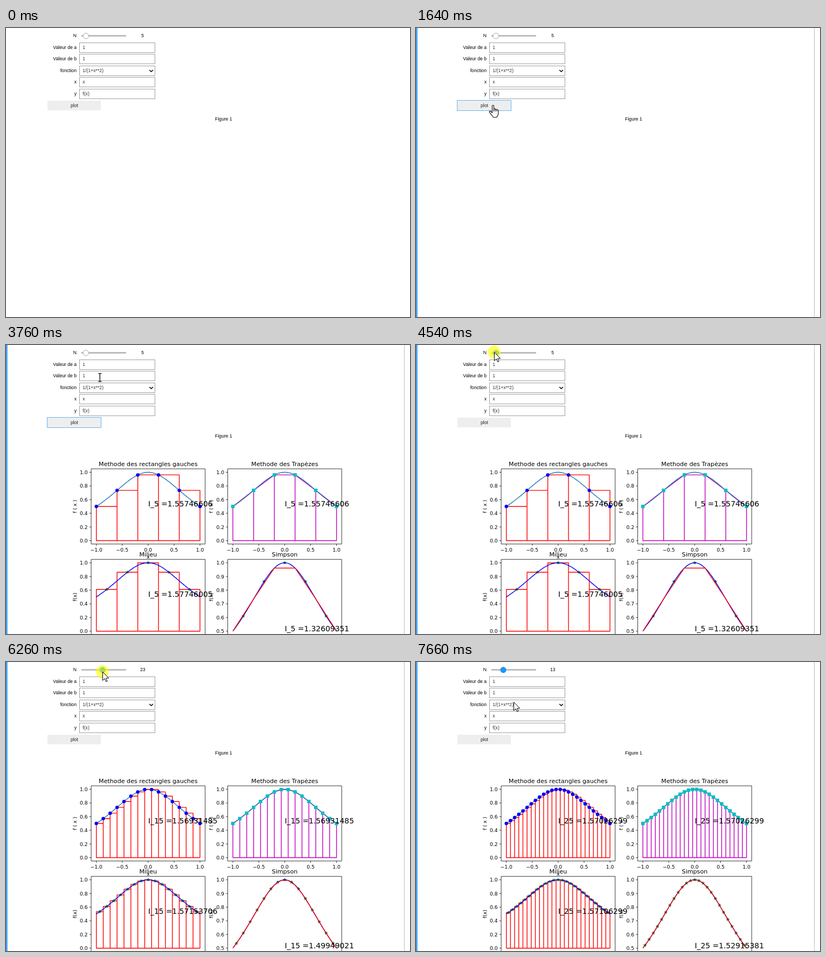
Recreate the animation shown at these times as an HTML page. Size 750 by 537 pixels, loop 8 s.

```html
<!DOCTYPE html>
<html lang="fr">
<head>
<meta charset="utf-8">
<title>Intégration numérique</title>
<style>
  html, body { margin: 0; width: 100%; height: 100%; overflow: hidden; background: #fff; }
  svg { display: block; }
  .ui { font: 8.67px "Liberation Sans", Arial, sans-serif; }
  .plot { font: 9.26px "DejaVu Sans", sans-serif; }
  .title { font-size: 11.11px; }
  .result { font-size: 13.89px; }
</style>
</head>
<body>
<svg id="stage" width="750" height="537" viewBox="0 0 750 537"></svg>
<script>
const LOOP = 8000;
const stage = document.getElementById('stage');

// Text fields: label, content, top edge
const FIELDS = [
  ['Valeur de a', '1', 27], ['Valeur de b', '1', 48], ['fonction', '1/(1+x**2)', 70],
  ['x', 'x', 91], ['y', 'f(x)', 113]
];

// Pointer glides: start, end, number of steps, destination
const GLIDES = [
  [70, 240, 4, 380, 296], [560, 710, 3, 207, 173], [880, 1190, 5, 142, 143],
  [2650, 2650, 1, 161, 126], [2735, 2820, 2, 182, 87], [3200, 3440, 4, 184, 73],
  [3760, 3990, 4, 145, 22], [4140, 4540, 6, 145, 13], [4860, 5150, 5, 165, 17],
  [5490, 5640, 3, 171, 18], [5800, 5940, 3, 176, 18], [6110, 6340, 4, 182, 18],
  [6570, 6800, 4, 161, 15], [7350, 7660, 5, 181, 74]
];
const PLOTS = [[1890, 5], [5320, 7], [5730, 15], [6270, 19], [7030, 25]];
const SIMPSON = { 5: '1.32609351', 7: '1.40569298', 15: '1.49949021', 19: '1.51529807', 25: '1.52915381' };

const text = (x, y, s, anchor = 'start', extra = '') =>
  `<text x="${x}" y="${y}" text-anchor="${anchor}" ${extra}>${s}</text>`;
const line = (d, color, width = 1.39) =>
  `<path d="${d}" fill="none" stroke="${color}" stroke-width="${width}" stroke-linejoin="round"/>`;
const f = x => 1 / (1 + x * x);
const range = (n, fn) => Array.from({ length: n }, (_, i) => fn(i));

function controls() {
  const rows = FIELDS.map(([label, value, top]) =>
    text(131, top + 12.2, label, 'end') +
    `<rect x="136.5" y="${top + .5}" width="140" height="18" fill="#fff" stroke="#9e9e9e"/>` +
    text(142.3, top + 12.2, value, 'start', 'fill="#333"')).join('');
  return `<g class="ui">${text(131, 17, 'N', 'end')}
    <rect x="140" y="13" width="83" height="3" fill="#bdbdbd"/>
    <circle id="handle" cy="14.8" r="5.2"/>
    <text id="value" x="253.7" y="17" text-anchor="middle"></text>
    ${rows}${line('M266.3 78l3.3 3.2 3.3-3.2', '#000', 1.6)}
    <g id="button"></g>${text(127, 147, 'plot', 'middle', 'fill="#222"')}
    ${text(404, 172, 'Figure 1', 'middle')}</g>`;
}

function axes({ cx, bottom, low, title, ylabel, draw, value }, n) {
  const X = x => (cx + 96.2 * x).toFixed(2);
  const Y = y => (bottom - 127 * (y - low) / (1 - low)).toFixed(2);
  const left = cx - 105.8, top = bottom - 133.4;
  const poly = pts => 'M' + pts.map(([x, y]) => `${X(x)} ${Y(y)}`).join('L');
  const marks = (xs, shape) => xs.map(x =>
    `<g transform="translate(${X(x)} ${Y(f(x))})">${shape}</g>`).join('');
  const curve = poly(range(101, i => [i / 50 - 1, f(i / 50 - 1)]));
  const nodes = range(n + 1, i => 2 * i / n - 1);
  const mids = range(n, i => (2 * i + 1) / n - 1);
  const bars = (l, r) => range(n, i => poly([[nodes[i], 0], [nodes[i], l(i)],
    [nodes[i + 1], r(i)], [nodes[i + 1], 0]]) + 'Z').join('');

  const frame = `M${left} ${top}h211.6v139.7h-211.6z`;
  let out = draw({ marks, poly, curve, nodes, mids, bars });
  out += line(frame, '#000', .8);
  for (let i = 0; i <= 5; i++) {
    const v = low + i * (1 - low) / 5, y = +Y(v);
    out += line(`M${left} ${y}h-3.2`, '#000', .8) + text(left - 6.5, y + 3.4, v.toFixed(1), 'end');
  }
  for (let v = -1; v <= 1; v += .5) {
    const x = X(v);
    out += line(`M${x} ${bottom + 6.3}v3.2`, '#000', .8) +
      text(x, bottom + 20.5, v.toFixed(1).replace('-', '−'), 'middle');
  }
  const lx = cx - 133, ly = bottom - 63.5;
  return out + text(cx, top - 5.6, title, 'middle', 'class="title"') +
    text(lx, ly, ylabel, 'middle', `transform="rotate(-90 ${lx} ${ly})"`) +
    text(cx, bottom - (low ? 0 : 63.5), `I_${n} =${value(n, nodes, mids)}`, 'start', 'class="result"');
}

const DOT = '<circle r="3.2" fill="#00f"/>';
const SQUARE = '<rect x="-3.2" y="-3.2" width="6.4" height="6.4" fill="#00bfbf"/>';
const STAR = '<path fill="#008000" stroke="#008000" stroke-width=".9" d="M' + range(10, i => {
  const r = i % 2 ? 1.06 : 2.78, a = i * Math.PI / 5;
  return `${(r * Math.sin(a)).toFixed(2)} ${(-r * Math.cos(a)).toFixed(2)}`;
}).join('L') + 'z"/>';
const sum = (xs, n) => (xs.reduce((s, x) => s + f(x), 0) * 2 / n).toFixed(8);
const leftSum = (n, nodes) => sum(nodes.slice(0, n), n);

const CHARTS = [
  { cx: 263.9, bottom: 363.5, low: 0, title: 'Methode des rectangles gauches', ylabel: 'f ( x )',
    value: leftSum,
    draw: p => line(p.curve, '#1f77b4') +
      line(p.bars(i => f(p.nodes[i]), i => f(p.nodes[i])), '#f00') + marksOf(p, p.nodes, DOT) },
  { cx: 517.4, bottom: 363.5, low: 0, title: 'Methode des Trapèzes', ylabel: 'f ( x )',
    value: leftSum,
    draw: p => line(p.bars(i => f(p.nodes[i]), i => f(p.nodes[i + 1])), '#bf00bf') +
      line(p.curve, '#1f77b4') + marksOf(p, p.nodes, SQUARE) },
  { cx: 263.9, bottom: 531.7, low: 0, title: 'Milieu', ylabel: 'f(x)',
    value: (n, nodes, mids) => sum(mids, n),
    draw: p => line(p.bars(i => f(p.mids[i]), i => f(p.mids[i])), '#f00') +
      marksOf(p, p.mids, STAR) + line(p.curve, '#00f') },
  { cx: 517.4, bottom: 531.7, low: .5, title: 'Simpson', ylabel: 'f(x)',
    value: n => SIMPSON[n],
    draw: p => marksOf(p, p.mids, STAR) + line(p.curve, '#00f') +
      line(p.poly(p.nodes.map(x => [x, f(x)])), '#f00') }
];
function marksOf(p, xs, shape) { return p.marks(xs, shape); }

const charts = n => n ? CHARTS.map(c => axes(c, n)).join('') + text(263.9, 397, 'x', 'middle') : '';

const POINTERS = {
  arrow: '<path d="M.5.5V16.3L4.2 12.9 6.6 18.4 9 17.4 6.6 12H11.7Z" fill="#fff" stroke="#000"/>',
  text: '<path d="M-3-7.5H-.7Q0-7.5 0-6.5Q0-7.5.7-7.5H3M0-6.5V6.5M-3 7.5H-.7Q0 7.5 0 6.5Q0 7.5.7 7.5H3" fill="none" stroke="#000" stroke-width="1.3"/>',
  hand: `<g transform="translate(-6.5 0)" stroke="#000" stroke-width="1.1" stroke-linejoin="round">
    <path fill="#fff" d="M6 2C6 0 9 0 9 2V8C9 6.8 11.7 6.8 11.8 8.4C12 7.4 14.5 7.6 14.5 9.2C14.8 8.4 17.3 8.8 17.3 10.5V16C17.3 19 15.5 20 14.5 22.5Q11 24 7.5 22.5C7 20 3 17 1 13.5C0 11.5 2 10.5 3.5 12L6 14.5Z"/>
    <path fill="none" d="M9 8V12M11.8 8.5V12M14.5 9.5V12"/></g>`
};

function pointerAt(t) {
  let x = 636, y = 540;
  for (const [start, end, steps, tx, ty] of GLIDES) {
    if (t < start) break;
    const k = t >= end ? 1 : (1 + Math.floor((steps - 1) * (t - start) / (end - start))) / steps;
    x += (tx - x) * k;
    y += (ty - y) * k;
  }
  return [x, y];
}

function pointerKind(x, y) {
  if (x > 77 && x < 176 && y > 135 && y < 153) return 'hand';
  const inField = ([label, , top]) => label !== 'fonction' && y > top && y < top + 19;
  return x > 136 && x < 277 && FIELDS.some(inField) ? 'text' : 'arrow';
}

function sliderAt(t) {
  if (t < 4860) return 5;
  const [x] = pointerAt(Math.min(t, 7100));
  return 5 + 2 * Math.floor(Math.max(0, x - 146.8) / 3.43);
}

function buttonLook(hover, pressed, focused) {
  const shadow = (dy, a) => `<rect x="76.3" y="${134.5 + dy}" width="100.4" height="18.8" rx="1" fill="#000" opacity="${a}"/>`;
  const face = '<rect x="77" y="135" width="99" height="18" fill="#eee"/>';
  if (focused && !pressed) return face + '<rect x="76.5" y="134.5" width="100" height="19" fill="none" stroke="#64b5f6"/>';
  if (!hover) return face;
  return shadow(1.4, .12) + shadow(.7, pressed ? .35 : .22) +
    `<rect x="76.5" y="134.7" width="100" height="18.3" rx="1" fill="${pressed ? '#ddd' : '#eee'}"/>`;
}

stage.innerHTML = controls() + `<g id="plot" class="plot"></g>
  <g id="cell"><rect width="2.8" height="537" fill="#42a5f5"/><rect x="739" width="1" height="537" fill="#bdbdbd"/></g>
  <circle id="glow" r="12" fill="#ff0" opacity=".62"/><g id="pointer"></g>`;
const el = id => document.getElementById(id);
const cache = {};
function setHtml(id, key, build) {
  if (cache[id] === key) return;
  cache[id] = key;
  el(id).innerHTML = build();
}
const show = (id, on) => el(id).setAttribute('visibility', on ? 'visible' : 'hidden');
const between = (t, a, b) => t >= a && t < b;

function render(t) {
  const [x, y] = pointerAt(t);
  const kind = pointerKind(x, y);
  const n = sliderAt(t);
  const plot = PLOTS.reduce((v, [start, count]) => t >= start ? count : v, 0);
  const pressed = between(t, 1410, 1490);
  const focused = between(t, 1410, 4460);
  const active = t >= 4380;

  setHtml('plot', plot, () => charts(plot));
  setHtml('value', n, () => n);
  setHtml('button', `${kind === 'hand'}${pressed}${focused}`, () => buttonLook(kind === 'hand', pressed, focused));
  setHtml('pointer', kind, () => POINTERS[kind]);

  const handle = el('handle');
  handle.setAttribute('cx', 148.3 + (n - 5) * 1.714);
  handle.setAttribute('fill', active ? '#2196f3' : '#fff');
  handle.setAttribute('stroke', active ? '#2196f3' : '#a8a8a8');

  show('cell', t >= 1640);
  show('pointer', t >= 70);
  el('pointer').setAttribute('transform', `translate(${x.toFixed(1)} ${y.toFixed(1)})`);
  show('glow', pressed || between(t, 4460, 7100));
  el('glow').setAttribute('cx', x);
  el('glow').setAttribute('cy', y);
}

function tick() {
  render(performance.now() % LOOP);
  requestAnimationFrame(tick);
}
tick();
</script>
</body>
</html>
```
